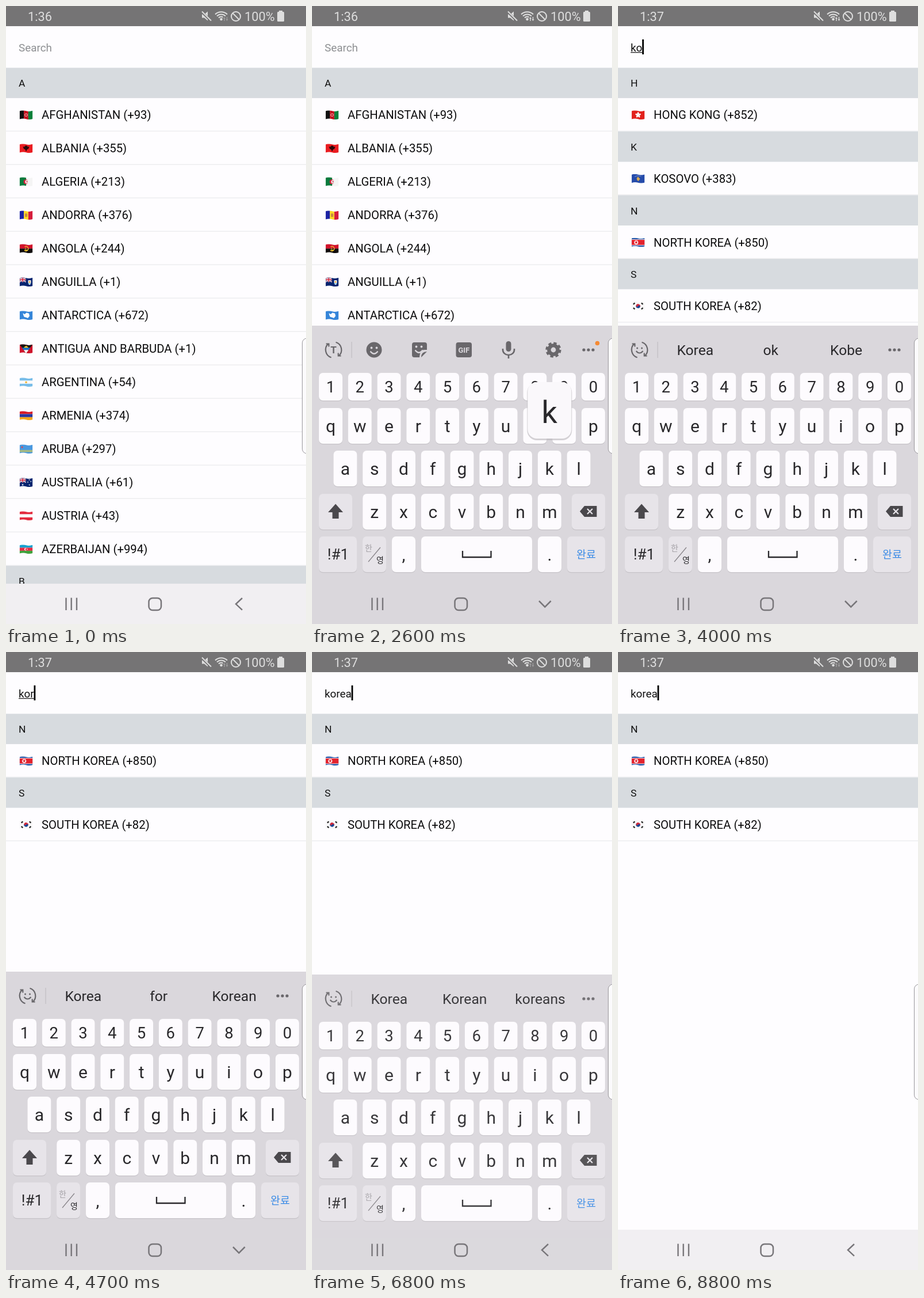
An HTML page that plays this animation: 522x1073 px, repeating every 9.1 s.

```html
<!DOCTYPE html>
<html lang="en">
<head>
<meta charset="utf-8">
<title>Country search</title>
<style>
html, body { margin: 0; width: 522px; height: 1073px; overflow: hidden; background: #fefdff; }
svg { display: block; font-family: Roboto, "Noto Sans CJK KR", "Noto Sans CJK", sans-serif; }
</style>
</head>
<body>
<svg id="stage" width="522" height="1073" viewBox="0 0 522 1073"></svg>
<script>
const LOOP = 9100;
const INK = '#29282b', GREY = '#69676b', BOARD = '#dad7dc', KEY = '#fdfbfe', SIDE = '#e7e4e9';

// shape helpers
const rect = (x, y, w, h, fill, rx = 0, more = '') =>
  `<rect x="${x}" y="${y}" width="${w}" height="${h}" rx="${rx}" fill="${fill}" ${more}/>`;
const disc = (x, y, r, fill) => `<circle cx="${x}" cy="${y}" r="${r}" fill="${fill}"/>`;
const ring = (x, y, r, stroke, w, more = '') =>
  `<circle cx="${x}" cy="${y}" r="${r}" fill="none" stroke="${stroke}" stroke-width="${w}" ${more}/>`;
const fill = (d, color) => `<path d="${d}" fill="${color}"/>`;
const line = (d, color, w, more = '') =>
  `<path d="${d}" fill="none" stroke="${color}" stroke-width="${w}" ${more}/>`;
const label = (x, y, size, color, str, anchor = 'start', more = '') =>
  `<text x="${x}" y="${y}" font-size="${size}" fill="${color}" text-anchor="${anchor}" ${more}>${str}</text>`;
const at = (x, y, body, more = '') => `<g transform="translate(${x} ${y})" ${more}>${body}</g>`;
const star = (x, y, r, color) => {
  let d = '';
  for (let i = 0; i < 10; i++) {
    const a = Math.PI * i / 5, q = i % 2 ? r * .42 : r;
    d += (i ? 'L' : 'M') + (x + q * Math.sin(a)).toFixed(2) + ' ' + (y - q * Math.cos(a)).toFixed(2);
  }
  return fill(d + 'Z', color);
};

// flags on a 23 x 16 cloth
const rows = (...cs) => cs.map((c, i) => rect(0, 16 * i / cs.length, 23, 16 / cs.length, c)).join('');
const cols = (...cs) => cs.map((c, i) => rect(23 * i / cs.length, 0, 23 / cs.length, 16, c)).join('');
const moon = (x, y, r, color, back) => disc(x, y, r, color) + disc(x + r * .45, y, r * .75, back);
const ensign = rows('#06246f') +
  line('M0 0L11 8M11 0L0 8', '#fff', 1.7) + line('M0 0L11 8M11 0L0 8', '#d1213a', .6) +
  line('M5.5 0V8M0 4H11', '#fff', 2.8) + line('M5.5 0V8M0 4H11', '#d1213a', 1.5);
const flags = {
  AFGHANISTAN: cols('#111', '#c40f1b', '#08813b') + ring(11.5, 8, 2.3, '#f3d9d6', .9),
  ALBANIA: rows('#ea1c21') + fill('M11.5 3L14 4 13.6 5.4 17 5 15.5 9 13.4 9.5 11.5 13.5 9.6 9.5 7.5 9 6 5 9.4 5.4 9 4Z', '#2a0809'),
  ALGERIA: cols('#087a3c', '#f5f5f5') + moon(11, 8, 4, '#d5223f', '#eef3ee') + star(13, 8, 1.8, '#d5223f'),
  ANDORRA: cols('#1b22a4', '#fcd922', '#d51b3c') + rect(9.4, 5, 4.2, 6, '#c88a45', 1),
  ANGOLA: rows('#d1122c', '#100c0c') + line('M9 4.8A4 4 0 1 1 8.5 11M9 10L14.5 11', '#f2c731', 1.2) + star(10.7, 7.4, 1.4, '#f2c731'),
  ANGUILLA: ensign + fill('M15 5H20V9Q20 12 17.5 13Q15 12 15 9Z', '#fff') + disc(17.5, 8, 1.4, '#f39a2b') + rect(15.4, 10, 4.2, 1.5, '#69b9d1'),
  ANTARCTICA: rows('#3585d9') + fill('M6 4L9 6 12 3.2 16.5 4.5 17.5 9 14.5 12.8 11.5 11.5 8 10.5 6.5 7Z', '#fafcff'),
  ANTIGUA: rows('#cf142b') + fill('M0 0H23L11.5 16Z', '#151515') + fill('M4.3 6H18.7L15.8 10H7.2Z', '#1673c9') +
    fill('M7.2 10H15.8L11.5 16Z', '#fff') + fill('M7.7 6L9 4 10 4.4 11.5 2.4 13 4.4 14 4 15.3 6Z', '#fbd12b'),
  ARGENTINA: rows('#78bde9', '#fafafa', '#78bde9') + disc(11.5, 8, 1.8, '#efb638'),
  ARMENIA: rows('#d91b27', '#2738a2', '#f2a51c'),
  ARUBA: rows('#4998df') + rect(0, 10, 23, 1, '#f4d636') + rect(0, 12, 23, 1, '#f4d636') + star(4.5, 4.8, 2.4, '#e63d42'),
  AUSTRALIA: ensign + star(5.5, 12, 2, '#fff') +
    [[17, 3.5], [14.5, 7.5], [19.8, 6.5], [17.2, 12.3]].map(([x, y]) => star(x, y, 1.4, '#fff')).join(''),
  AUSTRIA: rows('#e32b3e', '#fafafa', '#e32b3e'),
  AZERBAIJAN: rows('#16a2cf', '#e62a43', '#40a23c') + moon(10.8, 8, 2.3, '#fff', '#e62a43') + star(13.5, 8, 1.3, '#fff'),
  BURKINA: rows('#e5202c', '#079a49') + star(11.5, 8.3, 3.2, '#fbd31c'),
  COCOS: rows('#087b34') + disc(5, 4.5, 2.2, '#f3d036') + moon(11.5, 8, 2.4, '#f3d036', '#087b34') +
    [[18, 3.5], [16, 7], [20, 6.5], [18, 12]].map(([x, y]) => star(x, y, 1.1, '#f3d036')).join(''),
  COOK: ensign + ring(16.8, 8, 4, '#fff', 1.1, 'stroke-dasharray="1.1 .99"'),
  DENMARK: rows('#d41a36') + line('M8 0V16M0 8H23', '#fff', 2.6),
  HONG: rows('#e2211c') + [0, 72, 144, 216, 288].map(a =>
    `<ellipse cx="11.5" cy="5.4" rx="1.5" ry="2.4" fill="#fff" transform="rotate(${a} 11.5 8)"/>`).join(''),
  KOSOVO: rows('#254baa') + fill('M9 7L11.5 4.8 15 8.4 12 12.3 9.6 10.5Z', '#d7aa52') + line('M6 4.4Q11.5 1.6 17 4.4', '#fff', 1, 'stroke-dasharray="1 1.2"'),
  NORTH: rows('#1d4fa3') + rect(0, 2.7, 23, 10.6, '#fff') + rect(0, 3.6, 23, 8.8, '#e3222d') + disc(8.2, 8, 3.5, '#fff') + star(8.2, 8, 3.2, '#e3222d'),
  SOUTH: rows('#f8f7f8') + '<g transform="rotate(25 11.5 8)">' + fill('M7.8 8A3.7 3.7 0 0 1 15.2 8Z', '#d02a3c') +
    fill('M7.8 8A3.7 3.7 0 0 0 15.2 8Z', '#154796') + disc(9.65, 8, 1.85, '#d02a3c') + disc(13.35, 8, 1.85, '#154796') + '</g>' +
    line('M3.2 5L5.7 2.5M17.3 2.5L19.8 5M3.2 11L5.7 13.5M17.3 13.5L19.8 11', '#222', 2.3)
};

// "#X" is a section header
const KOREAS = ['#N', 'NORTH KOREA (+850)', '#S', 'SOUTH KOREA (+82)'];
const lists = {
  all: ['#A', 'AFGHANISTAN (+93)', 'ALBANIA (+355)', 'ALGERIA (+213)', 'ANDORRA (+376)', 'ANGOLA (+244)',
    'ANGUILLA (+1)', 'ANTARCTICA (+672)', 'ANTIGUA AND BARBUDA (+1)', 'ARGENTINA (+54)', 'ARMENIA (+374)',
    'ARUBA (+297)', 'AUSTRALIA (+61)', 'AUSTRIA (+43)', 'AZERBAIJAN (+994)', '#B'],
  k: ['#B', 'BURKINA FASO (+226)', '#C', 'COCOS (KEELING) ISLANDS (+61)', 'COOK ISLANDS (+682)',
    '#D', 'DENMARK (+45)', '#F'],
  ko: ['#H', 'HONG KONG (+852)', '#K', 'KOSOVO (+383)', ...KOREAS],
  kor: KOREAS
};
const drawList = items => {
  let y = 107.3;
  return items.map(item => {
    const top = y;
    if (item[0] === '#') {
      y += 52.6;
      return rect(0, top, 522, 52.6, '#d7dbdf') + label(22, top + 33, 17.4, '#111', item[1]);
    }
    y += 58;
    return rect(0, y - 1.4, 522, 1.4, '#ededef') + label(62, top + 36.4, 20.3, '#0c0c0d', item) +
      at(23.5, top + 21.3, flags[item.split(' ')[0]], 'clip-path="url(#wave)"');
  }).join('');
};

// keyboard
const keyPos = {};
const cap = (x, y, w, h, color = KEY) => rect(x, y + 1.2, w, h, '#c6c3c8', 7) + rect(x, y, w, h, color, 7);
const keyRow = (chars, x0, y, h, size, drop) => [...chars].map((ch, i) => {
  const x = x0 + i * 50.77;
  keyPos[ch] = [x, y + h / 2];
  return cap(x - 20.5, y, 41, h) + label(x, y + h / 2 + drop, size, INK, ch, 'middle');
}).join('');

const cycle = inner => at(37.5, 597,
  line('M-4 13.2A14 14 0 0 1-9-10.7M-13-10.5H-8.2V-5.5M4-13.2A14 14 0 0 1 9 10.7M13 10.5H8.2V5.5', GREY, 2.2) + inner);
const more = [473, 481, 489].map(x => disc(x, 597, 2.6, GREY)).join('');
const smile = (x, y, c) => at(x, y, disc(-4.5, -3.5, 1.9, c) + disc(4.5, -3.5, 1.9, c) + line('M-6.5 2.5Q0 11 6.5 2.5', c, 2.3));
const tools = cycle(label(0, 6, 17, GREY, 'T', 'middle', 'font-weight="700"')) +
  disc(108, 597, 13.5, GREY) + smile(108, 597, BOARD) +
  fill('M178 584H196Q200 584 200 588V597H195Q188 597 187 610H178Q174 610 174 606V588Q174 584 178 584Z', GREY) +
  smile(186, 595, BOARD) + fill('M190 610Q190 600 200 600Z', GREY) +
  rect(250.5, 584, 27.5, 26, GREY, 4) + label(264.3, 602, 13, BOARD, 'GIF', 'middle', 'font-weight="700"') +
  at(342, 597, rect(-4.5, -15, 9, 18, GREY, 4.5) + line('M-10-2V0A10 9 0 0 0 10 0V-2M0 9V15', GREY, 2.6)) +
  at(420, 597, ring(0, 0, 7.6, GREY, 6.4) + ring(0, 0, 11.5, GREY, 4.2, 'stroke-dasharray="5.2 3.83"')) +
  more + disc(496.5, 585.5, 3.8, '#f58a34');
const hints = {
  k: ['korea', 'know', 'kkk'], ko: ['Korea', 'ok', 'Kobe'], kor: ['Korea', 'for', 'Korean'],
  kore: ['Korea', 'more', 'Korean'], korea: ['Korea', 'Korean', 'koreans']
};
const drawBar = name => name === 'tools' ? tools :
  cycle(disc(-4, -3, 1.5, GREY) + disc(4, -3, 1.5, GREY) + line('M-6 2Q0 9 6 2', GREY, 2)) + more +
  hints[name].map((w, i) => label(134.3 + i * 131.4, 606, 24.65, INK, w, 'middle')).join('');

const board = rect(0, 555, 522, 640, BOARD) + rect(68.3, 583, 1.4, 28, '#c3c0c5') + '<g id="bar"></g>' +
  keyRow('1234567890', 32.5, 637, 48, 27.5, 10) +
  keyRow('qwertyuiop', 32.5, 698, 62, 30, 11) +
  keyRow('asdfghjkl', 57.9, 772, 62, 30, 11) +
  keyRow('zxcvbnm', 108.7, 847, 62, 30, 11) +
  cap(12, 847, 58, 62, SIDE) + fill('M41 864.5L54 879H46.5V890H35.5V879H28Z', '#4a484c') +
  cap(452, 847, 58, 62, SIDE) + fill('M466 877.5L474 868H495.5V887H474Z', '#4a484c') +
  line('M479 873L488 882M488 873L479 882', SIDE, 2.3) +
  cap(12, 921, 66, 62, SIDE) + label(45.5, 961, 26, INK, '!#1', 'middle') +
  cap(88, 921, 41, 62, SIDE) + label(98.5, 946, 14, '#a5a2a7', '한', 'middle') +
  line('M98 965L119 940', '#858287', 1.2) + label(118.5, 967, 14, INK, '영', 'middle') +
  cap(139, 921, 41, 62) + label(159.5, 963, 30, INK, ',', 'middle') +
  cap(190, 921, 193, 62) + line('M262 946V957H311.5V946', INK, 2.3) +
  cap(393, 921, 41, 62) + label(413.5, 963, 30, INK, '.', 'middle') +
  cap(444, 921, 66, 62, SIDE) + label(477, 958.5, 18.5, '#3a8be6', '완료', 'middle') +
  '<g id="pop"></g>';

const drawPop = ch => {
  if (!ch) return '';
  const [x, y] = keyPos[ch];
  return at(x - 38, y - 150, rect(-1, 1, 78, 100, '#b9b6bb', 17, 'opacity=".6"') +
    rect(0, 0, 76, 98, '#faf8fb', 16) + label(38, 71, 54, INK, ch, 'middle'));
};

const LIGHT = '#dedede';
const status = rect(0, 0, 522, 35, '#757475') + `<text id="clock" x="38" y="26" font-size="21.75" fill="${LIGHT}"></text>` +
  fill('M341 14.5H345L351 9.5V25.5L345 20.5H341Z', LIGHT) + line('M340.5 10L356 25.5', '#757475', 4) + line('M341 9.5L357 25.5', LIGHT, 2) +
  at(374.5, 25, disc(0, -2, 2.3, LIGHT) + [6.5, 10.7, 15].map(r =>
    line(`M${-r * .7} ${-r * .7}A${r} ${r} 0 0 1 ${r * .7} ${-r * .7}`, LIGHT, 2)).join('')) +
  rect(377.5, 18, 9.5, 9, '#757475') +
  `<g id="net">${fill('M378 22L380 19 382 22H380.7V26H379.3V22ZM382.5 23H383.8V19H385.2V23H386.5L384.5 26Z', LIGHT)}</g>` +
  ring(400, 18, 8, LIGHT, 2) + line('M394.5 12.5L405.5 23.5', LIGHT, 2) +
  label(415, 26, 21.75, LIGHT, '100%') + rect(472, 10, 12, 17, LIGHT, 1.5) + rect(475, 8, 6, 3, LIGHT);

const NAV = '#78767a';
const nav = line('M104.5 1027.5V1049M113.7 1027.5V1049M123 1027.5V1049', NAV, 2.4) +
  rect(248.5, 1028, 21.5, 21, 'none', 6.5, `stroke="${NAV}" stroke-width="2.5"`) +
  `<path id="back" fill="none" stroke="${NAV}" stroke-width="2.5"/>`;

const stage = document.getElementById('stage');
stage.innerHTML = `<defs><clipPath id="wave"><path d="M0 1.2C4-.6 8 0 11.5 1S19 2 23 .6V14.8C19 16.4 15 16 11.5 15S4 14 0 15.4Z"/></clipPath></defs>` +
  rect(0, 0, 522, 1073, '#fefdff') +
  Object.keys(lists).map(n => `<g class="list" data-name="${n}">${drawList(lists[n])}</g>`).join('') +
  label(22, 78.5, 18.85, '#8d8f92', 'Search', 'start', 'id="hint"') +
  '<text id="query" x="22" y="78.5" font-size="18.85" fill="#111"></text>' +
  rect(22, 80, 0, 1.3, '#222', 0, 'id="under"') + rect(22, 58, 2.8, 26, '#000', 0, 'id="caret"') +
  rect(0, 1003, 522, 70, '#f1eff2') + `<g id="board">${board}</g>` + nav +
  rect(515.5, 577, 20, 200, '#fcfbfd', 8, 'stroke="#98969a" stroke-width="1"') + status;

const $ = {};
stage.querySelectorAll('[id]').forEach(n => $[n.id] = n);
const groups = [...stage.querySelectorAll('.list')];

// each step changes a few values of the state
const steps = [
  [0, { clock: '1:36', text: '', list: 'all', bar: 'tools', pop: '', caret: 0, under: 0, net: 0, show: 0, dy: 0, down: 0 }],
  [1000, { net: 1 }],
  [1600, { caret: 1, down: 1, show: .08, dy: 96 }],
  [1700, { show: .36, dy: 68 }],
  [1800, { show: .65, dy: 41 }],
  [1900, { show: .92, dy: 13 }],
  [2000, { show: 1, dy: 0 }],
  [2200, { caret: 0 }],
  [2600, { pop: 'k' }],
  [2700, { text: 'k', caret: 1, under: 1, net: 0 }],
  [2800, { pop: '', list: 'k', bar: 'k' }],
  [2900, { pop: 'o' }],
  [3000, { text: 'ko' }],
  [3100, { pop: '', list: 'ko' }],
  [3200, { bar: 'ko' }],
  [3500, { caret: 0 }],
  [4000, { caret: 1, net: 1, clock: '1:37' }],
  [4500, { pop: 'r', caret: 0, net: 0 }],
  [4600, { text: 'kor', caret: 1 }],
  [4700, { pop: '', list: 'kor', bar: 'kor' }],
  [4800, { pop: 'e' }],
  [4900, { text: 'kore' }],
  [5000, { pop: '' }],
  [5100, { bar: 'kore' }],
  [5400, { caret: 0 }],
  [5700, { pop: 'a' }],
  [5800, { text: 'korea', caret: 1 }],
  [5900, { pop: '' }],
  [6000, { bar: 'korea' }],
  [6200, { caret: 0 }],
  [6700, { caret: 1, under: 0 }],
  [6800, { down: 0, show: .92, dy: 5 }],
  [6900, { show: .72, dy: 21 }],
  [7000, { show: .48, dy: 43 }],
  [7100, { show: 0 }],
  [7300, { caret: 0 }],
  [7800, { caret: 1, net: 1 }],
  [8100, { net: 0 }],
  [8300, { caret: 0 }],
  [8800, { caret: 1 }]
];
let state = {};
const states = steps.map(([, change]) => state = { ...state, ...change });

function draw(s) {
  $.clock.textContent = s.clock;
  $.query.textContent = s.text;
  $.hint.setAttribute('opacity', s.text ? 0 : 1);
  const w = s.text ? $.query.getComputedTextLength() : 0;
  $.under.setAttribute('width', s.under ? w : 0);
  $.caret.setAttribute('x', 21.8 + w);
  $.caret.setAttribute('opacity', s.caret);
  $.net.setAttribute('opacity', s.net ? 1 : .4);
  groups.forEach(g => g.style.display = g.dataset.name === s.list ? '' : 'none');
  $.bar.innerHTML = drawBar(s.bar);
  $.pop.innerHTML = drawPop(s.pop);
  $.board.setAttribute('opacity', s.show);
  $.board.setAttribute('transform', `translate(0 ${s.dy})`);
  $.back.setAttribute('d', s.down ? 'M395 1033L405.3 1043.5 415.7 1033' : 'M411 1028L400 1038.3 411 1048.7');
}

const start = performance.now();
let shown = -1;
function tick() {
  const t = (performance.now() - start) % LOOP;
  let i = steps.length - 1;
  while (steps[i][0] > t) i--;
  if (i !== shown) draw(states[shown = i]);
  requestAnimationFrame(tick);
}
tick();
</script>
</body>
</html>
```
